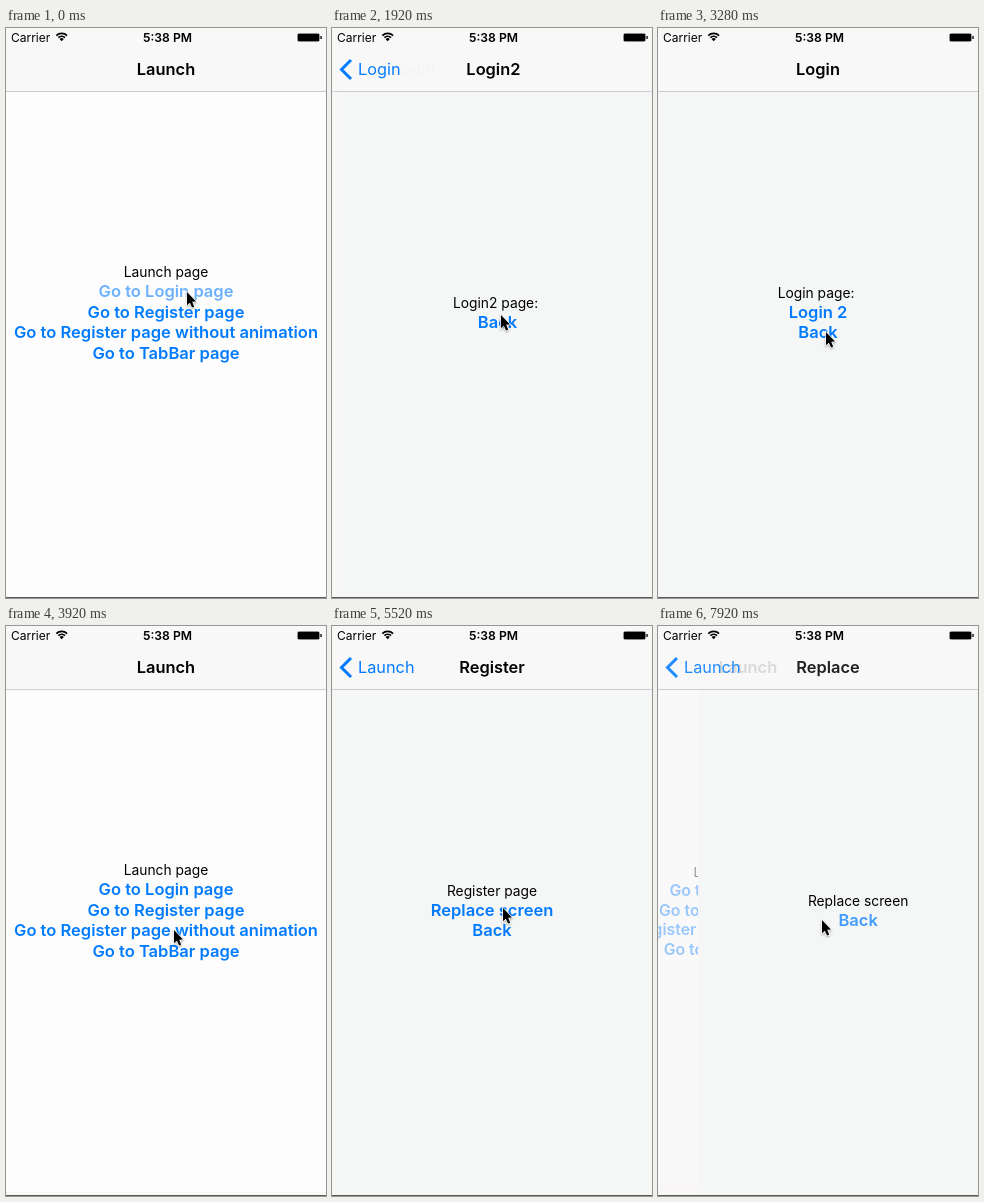
An HTML page with a canvas that plays this animation: 320 px wide and 570 px high, repeating every 8 s.

```html
<!DOCTYPE html>
<html lang="en">
<head>
<meta charset="utf-8">
<title>Navigation demo</title>
<style>
  html, body { margin: 0; width: 100%; height: 100%; overflow: hidden; background: #fdfdfd; }
  canvas { display: block; width: 320px; height: 570px; }
</style>
</head>
<body>
<canvas id="stage"></canvas>
<script>
const W = 320, H = 570, LOOP = 8000;
const BLUE = '#007aff', BACKDROP = '#f8f6f7';
const FAMILY = 'Inter, "Liberation Sans", sans-serif';
const canvas = document.getElementById('stage');
const ratio = window.devicePixelRatio || 1;
canvas.width = W * ratio;
canvas.height = H * ratio;
const ctx = canvas.getContext('2d');

const pages = {
  launch: { title: 'Launch', label: 'Launch page', color: '#fdfdfd', buttons: [
    'Go to Login page', 'Go to Register page',
    'Go to Register page without animation', 'Go to TabBar page'] },
  login: { title: 'Login', label: 'Login page: ', color: '#f5f7f7', buttons: ['Login 2', 'Back'] },
  login2: { title: 'Login2', label: 'Login2 page: ', color: '#f5f7f7', buttons: ['Back'] },
  register: { title: 'Register', label: 'Register page', color: '#f5f7f7', buttons: ['Replace screen', 'Back'] },
  replace: { title: 'Replace', label: 'Replace screen', color: '#f5f7f7', buttons: ['Back'] }
};

// Press time, page, button index
const taps = [
  [-50, pages.launch, 0], [1500, pages.login, 0], [2380, pages.login2, 0],
  [3420, pages.login, 1], [4450, pages.launch, 1], [6745, pages.register, 0],
  [7770, pages.replace, 0]
];

// Time, x, y of the pointer tip
const pointerPath = [
  [900, 181, 264], [1040, 169, 287], [2960, 169, 287], [3120, 168, 304],
  [4250, 168, 304], [4320, 171, 282], [5700, 171, 282], [5840, 204, 296],
  [6000, 171, 303], [6420, 171, 303], [6640, 173, 284], [7240, 173, 284],
  [7500, 164, 294]
];

// Critically damped spring from 0 to 1
function spring(ms) {
  const x = Math.max(0, ms) * 0.0185;
  return 1 - (1 + x) * Math.exp(-x);
}

function layer(alpha, draw) {
  ctx.save();
  ctx.globalAlpha *= alpha;
  draw();
  ctx.restore();
}

function text(str, x, y, size, weight, color = '#000', align = 'center') {
  ctx.font = `${weight} ${size}px ${FAMILY}`;
  ctx.textAlign = align;
  ctx.fillStyle = color;
  ctx.fillText(str, x, y);
}

function rect(color, x, y, w, h) {
  ctx.fillStyle = color;
  ctx.fillRect(x, y, w, h);
}

function buttonAlpha(page, index, t) {
  let alpha = 1;
  for (const [time, tapPage, tapIndex] of taps) {
    const dt = t - time;
    if (tapPage !== page || tapIndex !== index || dt < 0 || dt > 260) continue;
    alpha = dt < 60 ? 1 - 0.5 * dt / 60 : 0.5 + 0.5 * (dt - 60) / 200;
  }
  return alpha;
}

function drawPage(page, t) {
  rect(page.color, 0, 0, W, H);
  const top = 285.5 - (17 + 20.5 * page.buttons.length) / 2;
  text(page.label, 160, top + 13.3, 13.8, 400);
  page.buttons.forEach((name, i) => layer(buttonAlpha(page, i, t), () =>
    text(name, 160, top + 33.4 + 20.5 * i, 16.55, 600, BLUE)));
}

// Shrinks and fades whatever lies behind a newer screen
function drawBehind(p, shift, draw) {
  layer(1 - 0.7 * p, () => {
    const scale = 1 - 0.05 * p;
    ctx.translate(W / 2 - shift * p, H / 2);
    ctx.scale(scale, scale);
    ctx.translate(-W / 2, -H / 2);
    draw();
  });
}

function drawBar(base, next, p) {
  rect('#f9f8f9', 0, 0, W, 63);
  rect('#cdcdcf', 0, 63, W, 1);
  layer(1 - p, () => text(base.title, 160 - 80 * p, 47.2, 16.4, 600));
  if (!p) return;
  layer(p, () => {
    text(next.title, 160 + 80 * (1 - p), 47.2, 16.4, 600);
    text(base.title, 26, 47, 16.3, 400, BLUE, 'left');
    ctx.strokeStyle = BLUE;
    ctx.lineWidth = 3;
    ctx.beginPath();
    ctx.moveTo(19, 32);
    ctx.lineTo(9.5, 41.5);
    ctx.lineTo(19, 51);
    ctx.stroke();
  });
}

function drawStack(base, next, p, t) {
  rect(BACKDROP, 0, 0, W, H);
  drawBehind(p, 96, () => drawPage(base, t));
  if (p) layer(1, () => {
    ctx.translate(W * (1 - p), 0);
    drawPage(next, t);
  });
  drawBar(base, next, p);
}

function drawStatus() {
  text('Carrier', 5, 13.8, 12, 400, '#000', 'left');
  text('5:38 PM', 161.5, 13.8, 12.2, 600);
  ctx.strokeStyle = '#000';
  ctx.lineWidth = 1.7;
  for (const r of [4.7, 7.6]) {
    ctx.beginPath();
    ctx.arc(55.7, 13, r, -Math.PI * 0.75, -Math.PI * 0.25);
    ctx.stroke();
  }
  ctx.fillStyle = '#000';
  ctx.beginPath();
  ctx.moveTo(55.7, 13.2);
  ctx.arc(55.7, 13.2, 3, -Math.PI * 0.75, -Math.PI * 0.25);
  ctx.fill();
  ctx.strokeStyle = '#8a8a8a';
  ctx.lineWidth = 1;
  ctx.beginPath();
  ctx.roundRect(291.5, 5.5, 22, 8, 1.8);
  ctx.stroke();
  rect('#000', 292, 6, 21, 7);
  rect('#000', 314.4, 8, 1.3, 3);
}

function pointerAt(t) {
  const i = pointerPath.findIndex(([time]) => time > t);
  if (i === 0) return pointerPath[0].slice(1);
  if (i < 0) return pointerPath[pointerPath.length - 1].slice(1);
  const [t0, x0, y0] = pointerPath[i - 1], [t1, x1, y1] = pointerPath[i];
  const u = (t - t0) / (t1 - t0), k = u * u * (3 - 2 * u);
  return [x0 + (x1 - x0) * k, y0 + (y1 - y0) * k];
}

function drawPointer(t) {
  const [x, y] = pointerAt(t);
  layer(1, () => {
    ctx.translate(x, y);
    ctx.scale(0.9, 0.95);
    ctx.beginPath();
    ctx.moveTo(0, 0);
    for (const [px, py] of [[0, 14], [3.2, 11.2], [5.6, 16.4], [8, 15.4], [5.8, 10.2], [10, 10]]) ctx.lineTo(px, py);
    ctx.closePath();
    ctx.shadowColor = 'rgba(0,0,0,.35)';
    ctx.shadowBlur = 2 * ratio;
    ctx.shadowOffsetY = ratio;
    ctx.strokeStyle = '#fff';
    ctx.lineWidth = 1.6;
    ctx.stroke();
    ctx.shadowColor = 'transparent';
    ctx.fillStyle = '#000';
    ctx.fill();
  });
}

function render(t) {
  const modal = spring(t - 218) - spring(t - 3540);
  const login2 = spring(t - 1596) - spring(t - 2480);
  const push = spring(t - 4539) - spring(t - 7888);
  const pushed = t < 6890 ? pages.register : pages.replace;

  ctx.setTransform(ratio, 0, 0, ratio, 0, 0);
  rect(BACKDROP, 0, 0, W, H);
  drawBehind(modal, 0, () => drawStack(pages.launch, pushed, push, t));
  if (modal > 0.0001) layer(1, () => {
    ctx.translate(0, H * (1 - modal));
    drawStack(pages.login, pages.login2, login2, t);
  });
  drawStatus();
  rect('#5a5a5a', 0, 569, W, 1);
  drawPointer(t);
}

function tick() {
  render(performance.now() % LOOP);
  requestAnimationFrame(tick);
}
tick();
</script>
</body>
</html>
```
